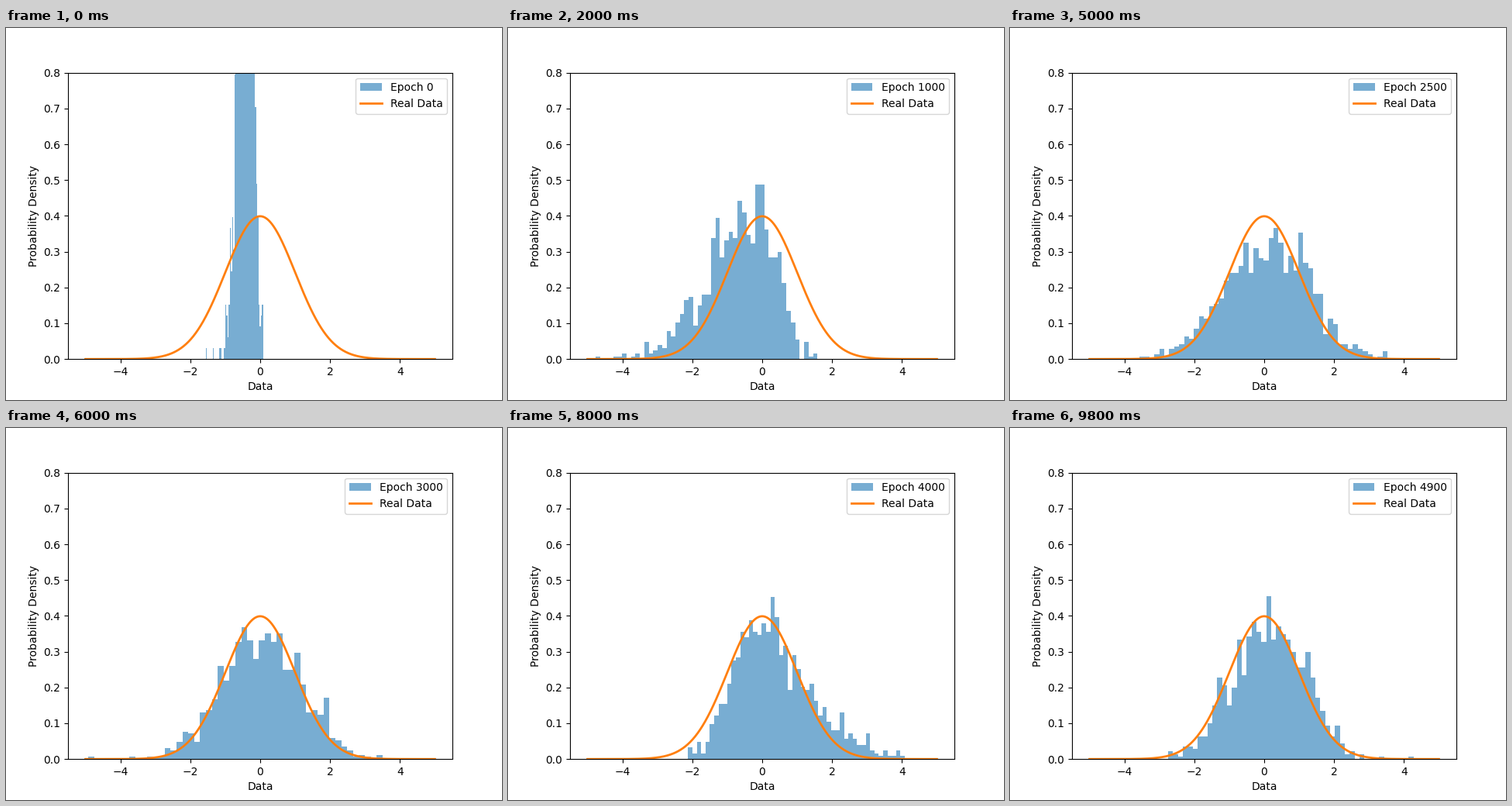
Animation, 640 px wide and 480 px high, one loop 10 s. Source, as a matplotlib script:

```python
import matplotlib.pyplot as plt
import numpy as np
from matplotlib.animation import FuncAnimation

FRAMES, INTERVAL, STEP = 50, 200, 100
BINS, SAMPLES = 50, 1000

# Key points of the drift: epoch, mode, left spread, right spread, lowest, highest.
DRIFT = np.array([
    (0, -0.35, 0.26, 0.16, -1.56, 0.08),
    (600, -0.25, 0.60, 0.28, -2.90, 0.75),
    (1000, 0.00, 1.42, 0.55, -4.77, 1.58),
    (1200, 0.05, 1.25, 0.75, -3.45, 2.30),
    (1700, 0.25, 1.15, 0.95, -2.69, 2.99),
    (2500, 0.10, 1.20, 1.15, -3.57, 3.53),
    (3000, 0.00, 1.10, 1.15, -4.92, 3.50),
    (3400, -0.30, 0.78, 1.32, -3.40, 3.65),
    (4000, -0.20, 0.75, 1.50, -2.12, 4.08),
    (4900, 0.15, 1.02, 0.96, -2.75, 4.27),
])


def generate(epoch):
    """Draw one generation of samples from a two-sided normal distribution."""
    mode, left, right, low, high = (
        np.interp(epoch, DRIFT[:, 0], column) for column in DRIFT[:, 1:].T)
    rng = np.random.default_rng(epoch)
    size = np.abs(rng.normal(size=SAMPLES))
    on_left = rng.random(SAMPLES) < left / (left + right)
    data = mode + np.where(on_left, -left, right) * size
    inside = data[(data > low) & (data < high)]
    return np.append(inside, (low, high))


fig, ax = plt.subplots(figsize=(6.4, 4.8), dpi=100)
x = np.linspace(-5, 5, 1000)
bell = np.exp(-x**2 / 2) / np.sqrt(2 * np.pi)


def draw(frame):
    epoch = frame * STEP
    ax.clear()
    ax.hist(generate(epoch), BINS, density=True,
            color="tab:blue", alpha=0.6, label=f"Epoch {epoch}")
    ax.plot(x, bell, color="tab:orange", lw=2, label="Real Data")
    ax.set(xlim=(-5.5, 5.5), ylim=(0, 0.8),
           xlabel="Data", ylabel="Probability Density")
    ax.legend(loc="upper right")
    return []


anim = FuncAnimation(fig, draw, frames=FRAMES, interval=INTERVAL,
                     init_func=lambda: draw(0), repeat=True, repeat_delay=0)
plt.show()
```
